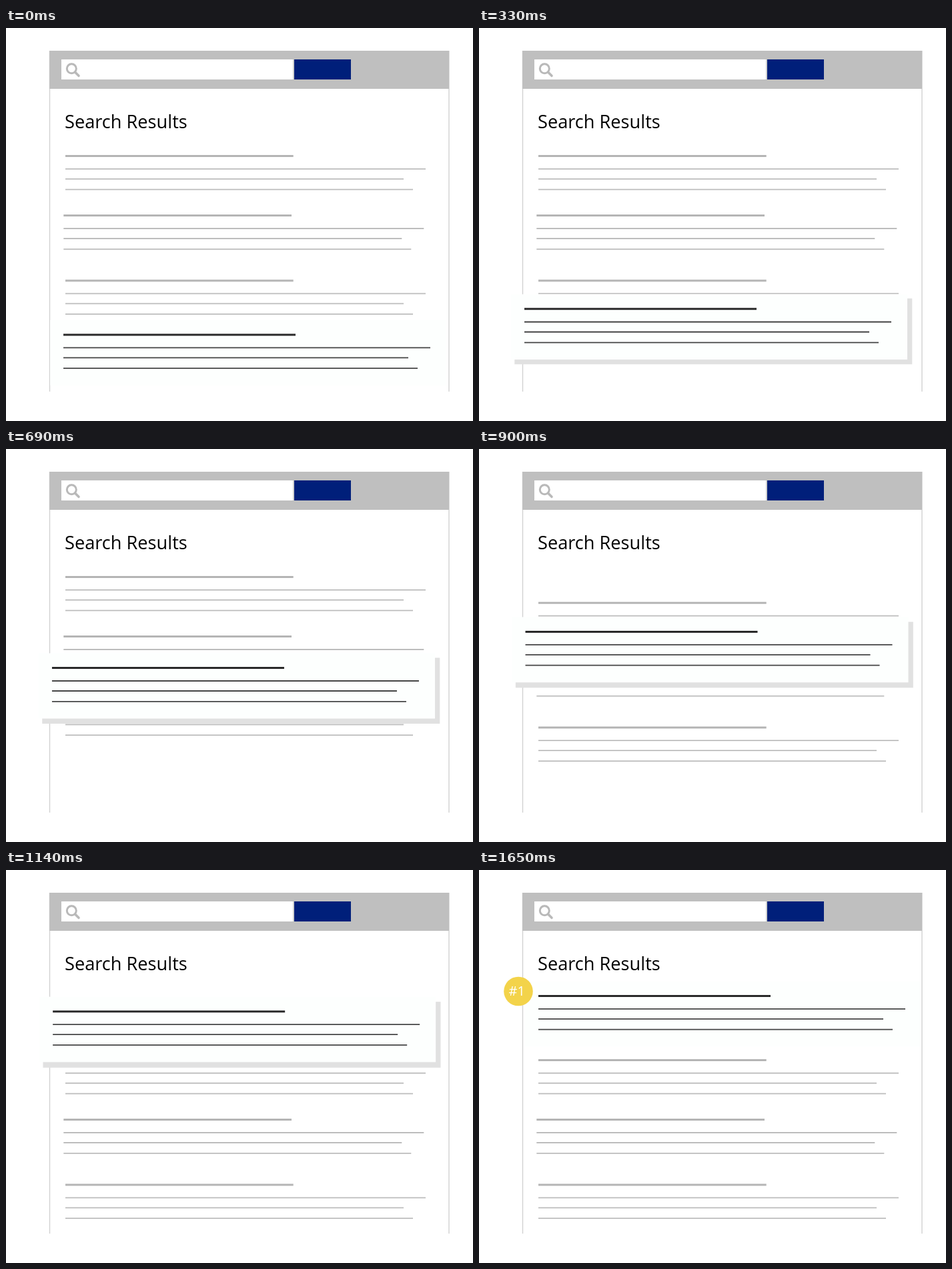
An HTML page that plays this animation: 700x588 px, repeating every 2180 ms.

```html
<!DOCTYPE html>
<html lang="en">
<head>
<meta charset="utf-8">
<title>Search Results</title>
<style>
  html, body { margin: 0; width: 100%; height: 100%; overflow: hidden; background: #fff; }
  svg { display: block; width: 700px; height: 588px; }
  text { font-family: "Open Sans", "Noto Sans", sans-serif; }
</style>
</head>
<body>
<svg viewBox="0 0 700 588">
  <path d="M65.5 34V544M664 34V544" stroke="#d2d2d2" stroke-width="1.4"/>
  <rect x="65" y="34" width="599" height="57" fill="#bfbfbf"/>
  <rect x="83" y="47" width="347" height="30" fill="#fff"/>
  <rect x="430" y="47" width="2" height="30" fill="#d0d0d0"/>
  <rect x="432" y="47" width="85" height="30" fill="#001f7a"/>
  <g fill="none" stroke="#b9b9b9" stroke-width="3">
    <circle cx="98.3" cy="60.8" r="7"/>
    <path d="M103.5 66L109 71.5" stroke-width="3.6" stroke-linecap="round"/>
  </g>
  <text x="88" y="150" font-size="27.2">Search Results</text>
  <g id="results"></g>
  <rect id="shadow" width="596" height="98.6" fill="#e1e1e1"/>
  <g id="card"><rect x="-20" y="-22" width="594" height="97.7" fill="#fdfffe"/></g>
  <g id="badge">
    <circle cx="59" cy="181.5" r="21.8" fill="#f3d34a"/>
    <text x="44.5" y="188.3" font-size="20" fill="#fff">#1</text>
  </g>
</svg>
<script>
const LOOP = 2180, STEP = 30;
const [results, shadow, card, badge] =
  ["results", "shadow", "card", "badge"].map(id => document.getElementById(id));

// A result is one thick title line and three thin lines below it.
function addResult(parent, x, y, widths, titleColor, lineColor) {
  const offsets = [0, 19.4, 34.4, 50.2];
  widths.forEach((width, i) => {
    const line = document.createElementNS("http://www.w3.org/2000/svg", "path");
    line.setAttribute("d", `M${x} ${y + offsets[i]}h${width}`);
    line.setAttribute("stroke", i ? lineColor : titleColor);
    line.setAttribute("stroke-width", i ? 1.8 : 3);
    parent.append(line);
  });
}

for (const [x, y] of [[89, 191.5], [86.3, 280.6], [89, 377.9]])
  addResult(results, x, y, [341.7, 540, 507, 521], "#b5b5b5", "#bdbdbd");
addResult(card, 0, 0, [348, 550, 517, 531], "#2a2a2a", "#454545");

const progress = (t, from, to) => Math.min(1, Math.max(0, (t - from) / (to - from)));
const move = (el, x, y) => el.setAttribute("transform", `translate(${x} ${y})`);

function draw(t) {
  const rise = progress(t, 180, 1230);
  const x = 86 - 18.4 * progress(t, 0, 180) + 2.8 * rise + 18.6 * progress(t, 1230, 1650);
  const y = 459 - 270.5 * rise;
  move(card, x, y);
  move(shadow, x - 14.7, y - 16 + 1.6 * rise);
  shadow.setAttribute("opacity", progress(t, 120, 180) - progress(t, 1320, 1440));
  move(results, 0, 93 * progress(t, 750, 1110));
  badge.setAttribute("opacity", progress(t, 1440, 1620));
}

function tick() {
  const t = performance.now() % LOOP;
  draw(Math.floor(t / STEP) * STEP);
  requestAnimationFrame(tick);
}
tick();
</script>
</body>
</html>
```
